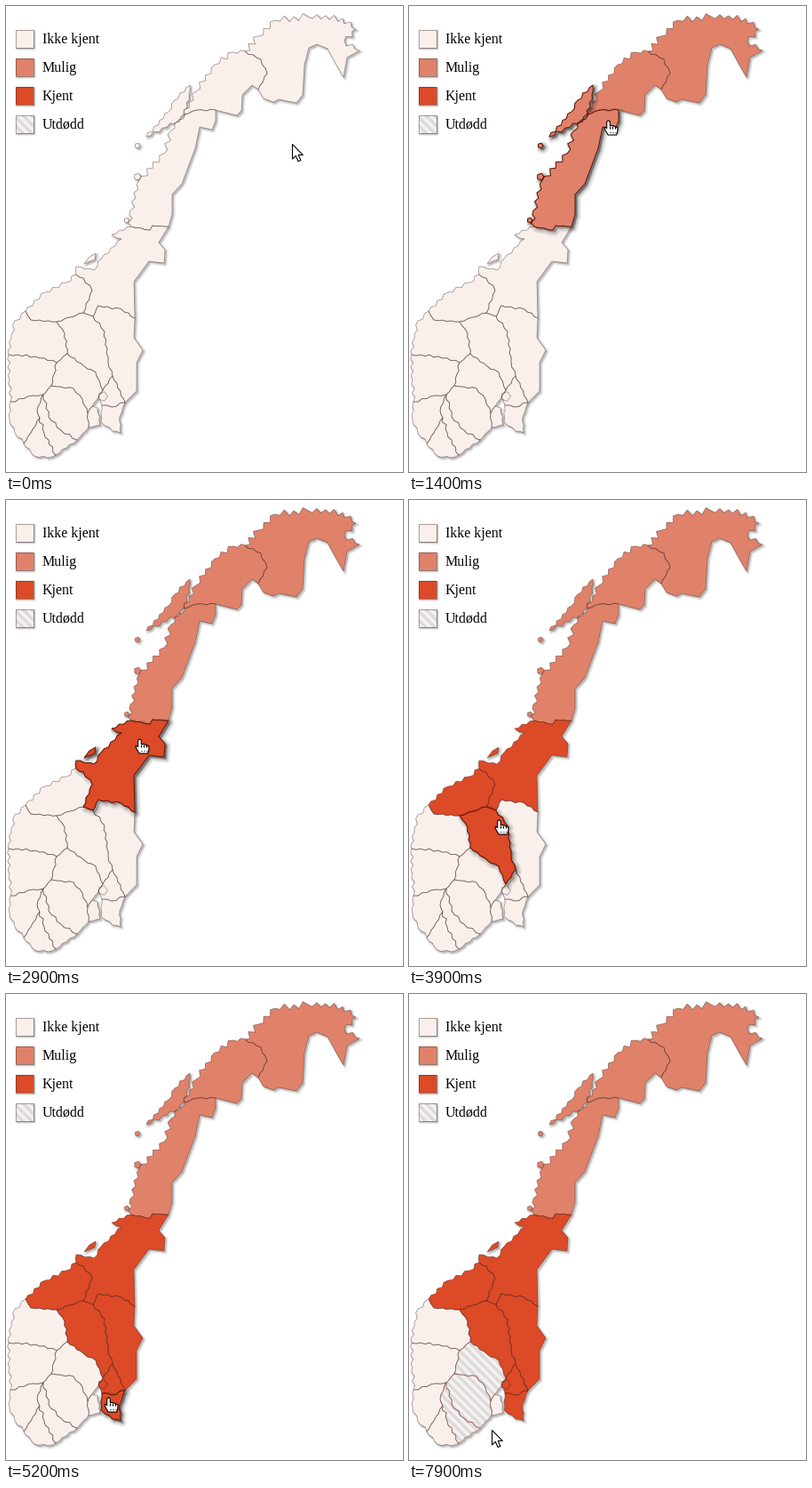
Animation of 447 by 524 pixels, one loop 8 s. Source, as a matplotlib script:

```python
import numpy as np
import matplotlib.pyplot as plt
from matplotlib.animation import FuncAnimation
from matplotlib.collections import LineCollection
from matplotlib.patches import PathPatch
from matplotlib.path import Path
from matplotlib.transforms import Affine2D

W, H, DPI = 447, 524, 100
PX = 72 / DPI
FRAMES, STEP = 80, 100

UNKNOWN, POSSIBLE, KNOWN, EXTINCT = range(4)
FILL = ['#f9f0ec', '#e0826a', '#dc4a27', '#f4f1f1']
LABELS = ['Ikke kjent', 'Mulig', 'Kjent', 'Utdødd']
STRIPE = '#dedada'
EDGE = (0.2, 0.07, 0.07, 0.45)
EDGE_EXTINCT = (0.48, 0.16, 0.14, 0.55)
EDGE_HOVER = '#5c1406'

# Points where borders and coasts meet.
NODES = dict(
    A=(269, 51), B=(284, 94), C=(398, 50), D=(236, 117), E=(200, 122),
    F=(141, 248), G=(183, 248), H=(79, 302), I=(87, 345), J=(98, 349),
    K=(145, 351), L=(22, 343), M=(57, 355), N=(3, 392), O=(57, 401),
    P=(69, 391), Q=(120, 416), R=(109, 432), S=(134, 446), T=(108, 449),
    U=(97, 450), V=(92, 458), W=(51, 427), X=(42, 437), Y=(5, 445),
    Z=(38, 463), a=(20, 492), b=(56, 505), c=(80, 488), d=(93, 474),
    e=(129, 480), f=(106, 471))

# Lines between two nodes: roughness, then the bends on the way.
EDGES = {
    'AC': (4, (284, 34), (303, 16), (340, 12), (379, 14), (394, 26), (381, 39)),
    'CB': (0, (384, 58), (380, 80), (373, 68), (362, 48), (350, 43), (341, 47),
           (336, 66), (334, 100), (327, 109), (307, 105), (301, 108),
           (290, 104)),
    'AB': (1.5, (287, 60), (294, 76)),
    'AE': (3, (256, 52), (235, 66), (214, 96)),
    'BD': (0, (277, 89), (266, 100), (265, 118), (260, 123)),
    'DE': (1, (215, 117)),
    'EF': (3.5, (186, 140), (178, 166), (150, 196), (140, 230)),
    'FG': (0.6, (162, 252), (165, 247)),
    'DG': (0, (236, 129), (232, 139), (218, 136), (213, 160), (198, 200),
           (187, 212), (187, 234)),
    'FH': (1.5, (119, 257), (130, 262), (107, 284), (99, 297), (79, 293)),
    'GK': (0, (172, 266), (179, 274), (178, 289), (161, 287), (144, 310)),
    'HI': (1.5, (87, 306), (97, 320)),
    'IJ': (0,),
    'JK': (1.2, (104, 337), (130, 341)),
    'HL': (2, (68, 311), (44, 322)),
    'LM': (0.8, (28, 353)),
    'MI': (1, (72, 350)),
    'LN': (2.5, (10, 354), (6, 374)),
    'MP': (1.2, (66, 368)),
    'PO': (1,),
    'NO': (1.5, (33, 394)),
    'JQ': (1.5, (111, 366), (115, 400)),
    'QR': (1,),
    'PR': (1, (88, 405), (101, 412)),
    'KS': (0, (144, 373), (154, 387), (147, 401), (147, 433)),
    'QS': (1,),
    'ST': (1.5, (119, 451)),
    'TR': (1, (104, 439)),
    'Se': (0.7, (128, 462)),
    'eT': (1, (120, 478), (107, 468)),
    'RU': (1, (103, 442)),
    'UV': (1,),
    'VW': (1, (86, 442), (76, 430), (57, 428)),
    'WO': (1.5, (54, 414)),
    'NY': (2, (4, 420)),
    'YX': (1.5, (30, 438)),
    'XW': (0.7,),
    'Ya': (2, (4, 464), (10, 480)),
    'XZ': (1, (35, 455)),
    'Za': (1, (28, 480)),
    'ab': (1, (32, 506), (47, 508)),
    'Zb': (2, (43, 480)),
    'bc': (1,),
    'Xc': (1.5, (48, 462), (62, 477)),
    'cd': (0.5,),
    'dV': (0.8,),
    'Uf': (1, (103, 452)),
    'fd': (0.5,),
}

COUNTIES = dict(
    finnmark='ACB', troms='ABDE', nordland='EDGF', trondelag='FGKJIH',
    more='HIML', sogn='LMPON', oppland='MIJQRP', hedmark='JKSQ',
    akershus='QSTR', ostfold='SeT', buskerud='PRUVWO', hordaland='NOWXY',
    rogaland='YXZa', vestagder='aZb', austagder='XcbZ', telemark='WVdcX',
    vestfold='UfdV')

# Pointer legs: first frame, last frame, end point.
LEGS = [(4, 8, 316, 59), (11, 12, 250, 85), (12, 13, 224, 128),
        (15, 19, 201, 180), (20, 22, 133, 264), (22, 24, 150, 268),
        (33, 36, 80, 322), (36, 38, 101, 359), (39, 42, 104, 388),
        (45, 47, 128, 392), (47, 48, 122, 430), (48, 49, 110, 439),
        (49, 51, 115, 453), (53, 54, 118, 458), (59, 64, 92, 431),
        (73, 74, 72, 452), (76, 77, 66, 488), (77, 78, 93, 490)]

# While the brush is down it paints every county the pointer enters.
BRUSH = [(11, 22, POSSIBLE), (26, 28, POSSIBLE), (29, 58, KNOWN),
         (68, 68, KNOWN), (69, 79, EXTINCT)]


def closed(p):
    p = np.asarray(p, float)
    return Path(np.vstack([p, p[:1]]), closed=True)


def jag(points, amp, seed):
    """Break a line into short pieces that zigzag by about amp pixels."""
    rng = np.random.default_rng(seed)
    points = np.array(points, float)
    out = [points[:1]]
    for p, q in zip(points, points[1:]):
        length = np.hypot(*(q - p))
        n = max(1, round(length / 5)) if amp else 1
        t = np.arange(1, n + 1)[:, None] / n
        side = amp * rng.uniform(0.3, 1, (n, 1)) * (-1.0) ** np.arange(n)[:, None]
        side[-1] = 0
        normal = np.array([p[1] - q[1], q[0] - p[0]]) / length
        out.append(p + t * (q - p) + side * normal)
    return np.vstack(out)


def border(key):
    amp, *via = EDGES[key]
    seed = ord(key[0]) * 256 + ord(key[1])
    return jag([NODES[key[0]], *via, NODES[key[1]]], amp, seed)


LINES = {k: border(k) for k in EDGES}


def outline(nodes):
    parts = []
    for a, b in zip(nodes, nodes[1:] + nodes[0]):
        line = LINES[a + b] if a + b in LINES else LINES[b + a][::-1]
        parts.append(line[:-1])
    return closed(np.vstack(parts))


def islet(x, y, size, n=5):
    t = np.arange(n) * 2 * np.pi / n
    return closed(np.column_stack([x + size * np.cos(t), y - size * np.sin(t)]))


SHAPES = {k: outline(v) for k, v in COUNTIES.items()}
long_isle = [(207, 89), (190, 106), (183, 119), (158, 147), (199, 127),
             (206, 100), (207, 89)]
SHAPES['nordland'] = Path.make_compound_path(
    SHAPES['nordland'], closed(jag(long_isle, 2, 3)),
    islet(148, 157, 3), islet(148, 192, 4), islet(136, 241, 3))
SHAPES['trondelag'] = Path.make_compound_path(
    SHAPES['trondelag'], closed([(88, 290), (94, 282), (101, 278), (100, 285)]))
SHAPES['oslo'] = islet(109, 439, 5.5)


def pointer_path():
    pos, last = np.empty((FRAMES, 2)), (322, 155)
    pos[:] = last
    for start, end, x, y in LEGS:
        i = np.arange(start, FRAMES)
        t = np.clip((i - start) / (end - start), 0, 1)[:, None]
        pos[start:] = last + t * (np.array([x, y]) - last)
        last = (x, y)
    return pos


def county_at(point):
    return next((k for k in reversed(SHAPES)
                 if SHAPES[k].contains_point(point)), None)


# The highlight follows the pointer one frame late.
POINTER = pointer_path()
HOVER = [None] + [county_at(p) for p in POINTER[:-1]]


def states(i):
    state = dict.fromkeys(SHAPES, UNKNOWN)
    for start, end, value in BRUSH:
        for k in HOVER[start:min(i, end) + 1]:
            if k:
                state[k] = value
    return state


fig = plt.figure(figsize=(W / DPI, H / DPI), dpi=DPI, facecolor='white')
ax = fig.add_axes([0, 0, 1, 1])
ax.set_xlim(0, W)
ax.set_ylim(H, 0)
ax.axis('off')


def patch(path, z, **kw):
    p = PathPatch(path, zorder=z, joinstyle='round', **kw)
    ax.add_patch(p)
    return p


def shadow(path, z, offset, blur, alpha):
    move = Affine2D().translate(offset, offset) + ax.transData
    color = (0, 0, 0, alpha)
    return [patch(path, z, facecolor=color, edgecolor=color, lw=w * PX,
                  transform=move) for w in np.linspace(0.3, blur, 5)]


def stripes(path, z):
    lines = LineCollection([[(k, 0), (k + H, H)] for k in range(-H, W, 10)],
                           colors=STRIPE, linewidths=3.5 * PX, zorder=z)
    ax.add_collection(lines, autolim=False)
    lines.set_clip_path(path, ax.transData)
    return lines


def legend():
    for i, label in enumerate(LABELS):
        x, y = 11, 27 + 32 * i
        box = closed([(x, y), (x + 20, y), (x + 20, y + 20), (x, y + 20)])
        shadow(box, 1, 1.3, 4, 0.035)
        patch(box, 2, facecolor=FILL[i], lw=0)
        if i == EXTINCT:
            stripes(box, 2.1)
        patch(box, 2.2, facecolor='none', edgecolor=EDGE, lw=0.8 * PX)
        ax.text(41, y + 15, label, family='Liberation Serif',
                size=16 * PX, color='black', va='baseline')


class County:
    def __init__(self, path):
        self.face = patch(path, 3, lw=0)
        self.lines = stripes(path, 3.1)
        self.edge = patch(path, 3.2, facecolor='none')

    def show(self, state, hover):
        z = 6 if hover else 3
        self.face.set_facecolor(FILL[state])
        self.lines.set_visible(state == EXTINCT)
        rest = EDGE_EXTINCT if state == EXTINCT else EDGE
        self.edge.set_edgecolor(EDGE_HOVER if hover else rest)
        self.edge.set_linewidth((1.0 if hover else 0.75) * PX)
        for dz, a in enumerate((self.face, self.lines, self.edge)):
            a.set_zorder(z + dz / 10)


ARROW = closed([(0, 0), (0, 16.5), (3.8, 13), (6.6, 19.2), (9.4, 18),
                (6.7, 12), (11.8, 12)])
HAND = closed([(-1.8, 1.5), (0, 0.3), (1.8, 1.5), (1.8, 6), (4.8, 6),
               (7.8, 7), (10.4, 8.4), (10.4, 12.4), (9.2, 16.5), (-0.4, 16.5),
               (-3.4, 11.4), (-4.5, 8.8), (-3.6, 7.6), (-1.8, 9.2)])
CREASES = Path([p for x in (1.8, 4.8, 7.8)
                for p in ((x, 6), (x, 9), (x - 0.4, 13), (x + 0.6, 13))],
               [Path.MOVETO, Path.LINETO] * 6)

legend()
shadow(Path.make_compound_path(*SHAPES.values()), 1, 1.7, 5, 0.035)
counties = {k: County(p) for k, p in SHAPES.items()}
glow = shadow(SHAPES['oslo'], 5, 2.5, 9, 0.055)
ink = dict(edgecolor='black', lw=1.1 * PX)
arrow = patch(ARROW, 9, facecolor='white', **ink)
hand = [patch(HAND, 9, facecolor='white', **ink),
        patch(CREASES, 9.1, facecolor='none', **ink)]


def draw(i):
    hover, state = HOVER[i], states(i)
    for name, county in counties.items():
        county.show(state[name], name == hover)
    for g in glow:
        g.set_visible(hover is not None)
        if hover:
            g.set_path(SHAPES[hover])
    x, y = np.round(POINTER[i]) + 0.5
    place = Affine2D().translate(x, y) + ax.transData
    for p in (arrow, *hand):
        p.set_transform(place)
        p.set_visible((p is arrow) == (hover is None))
    return []


anim = FuncAnimation(fig, draw, frames=FRAMES, interval=STEP,
                     init_func=lambda: draw(0), repeat=True, repeat_delay=0)
plt.show()
```
